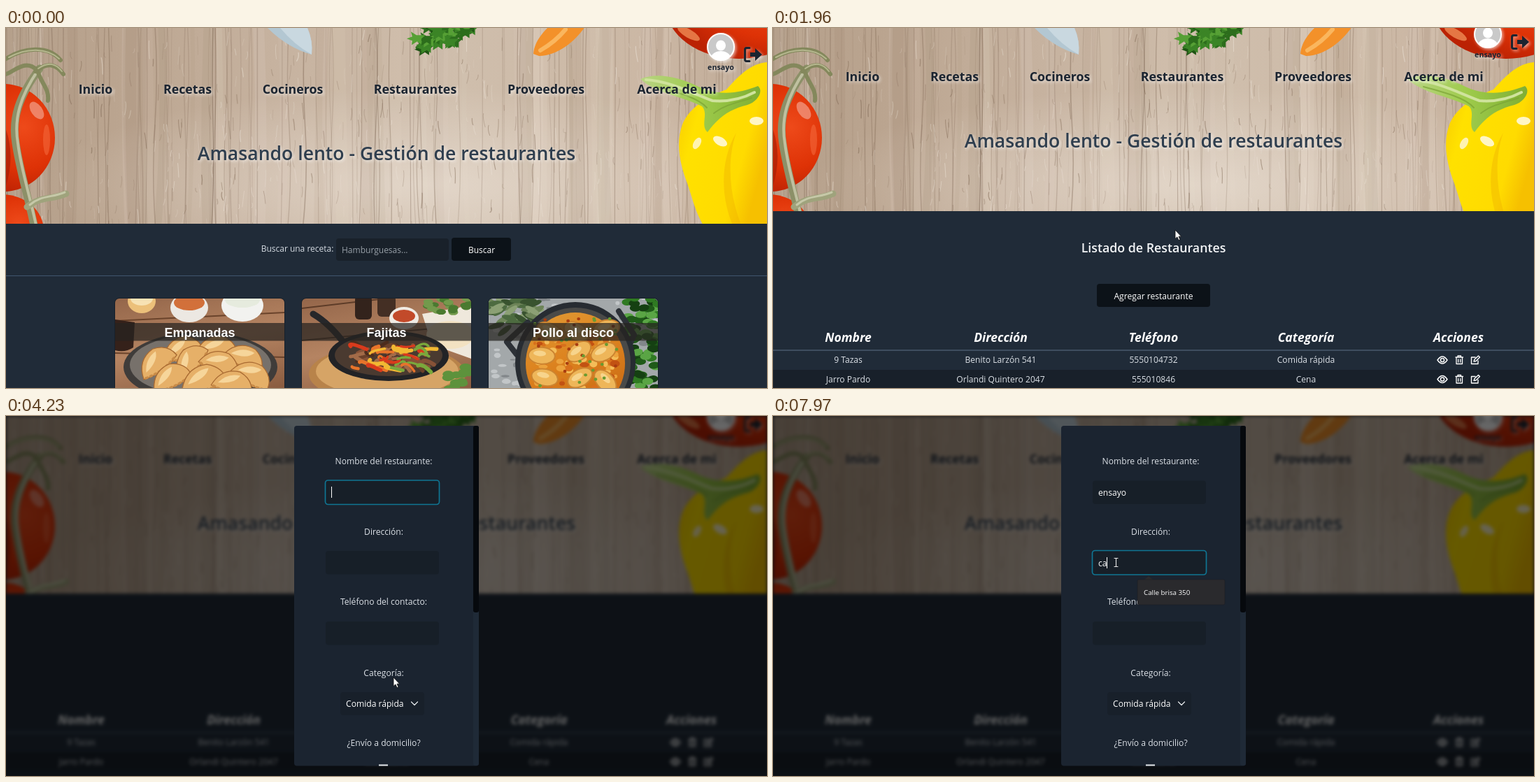
An HTML page for the animation above (8 s loop, 1088 by 515 pixels).

```html
<!DOCTYPE html>
<html lang="es">
<head>
<meta charset="utf-8">
<title>Gestión de restaurantes</title>
<style>
html, body { margin: 0; width: 100%; height: 100%; overflow: hidden; background: #202b38; }
svg { display: block; width: 100vw; height: 100vh; font-family: "Open Sans", "Noto Sans", sans-serif; }
text { white-space: pre; }
.glow { filter: drop-shadow(2px 2px 2px rgba(255,255,255,.6)); }
.arial { font-family: "Liberation Sans", Arial, sans-serif; }
</style>
</head>
<body>
<svg id="stage" viewBox="0 0 1088 515" xmlns="http://www.w3.org/2000/svg"></svg>
<script>
const LOOP = 8000;
let seed = 11;
const rnd = (a = 0, b = 1) => {
  seed = (seed * 16807) % 2147483647;
  return +(a + (b - a) * seed / 2147483647).toFixed(2);
};
const many = (n, f) => Array.from({ length: n }, (_, i) => f(i)).join('');

// Drawing helpers; text is placed by its visual middle.
const rect = (x, y, w, h, fill, more = '') =>
  `<rect x="${x}" y="${y}" width="${w}" height="${h}" fill="${fill}" ${more}/>`;
const oval = (x, y, rx, ry, fill, more = '') =>
  `<ellipse cx="${x}" cy="${y}" rx="${rx}" ry="${ry}" fill="${fill}" ${more}/>`;
const path = (d, fill, more = '') => `<path d="${d}" fill="${fill}" ${more}/>`;
const line = (d, color, width, more = '') =>
  path(d, 'none', `stroke="${color}" stroke-width="${width}" stroke-linecap="round" stroke-linejoin="round" ${more}`);
const text = (x, y, str, size, fill, more = 'text-anchor="middle"') =>
  `<text x="${x}" y="${(y + size * .36).toFixed(1)}" font-size="${size}" fill="${fill}" ${more}>${str}</text>`;
const left = 'text-anchor="start"';
const bold = 'text-anchor="middle" font-weight="700"';
const semi = 'text-anchor="middle" font-weight="600"';
const turned = (deg, x, y) => `transform="rotate(${deg} ${x} ${y})"`;

const stops = list => list.map(([o, c]) => `<stop offset="${o}" stop-color="${c}"/>`).join('');
const defs = `<defs>
<linearGradient id="wood">${stops([[0, '#b5a08b'], [.14, '#baa48f'], [.35, '#c6b29f'], [.6, '#cfbeac'], [.85, '#cbb7a4'], [1, '#bea995']])}</linearGradient>
<radialGradient id="shine" cx=".55" cy=".8" r=".5">${stops([[0, '#efe6dc'], [1, '#efe6dc00']])}</radialGradient>
<radialGradient id="tomato" cx=".7" cy=".4" r=".65">${stops([[0, '#ee4a1a'], [.6, '#de3206'], [1, '#bb2204']])}</radialGradient>
<linearGradient id="pepper" x2="1" y2=".5">${stops([[0, '#f5c400'], [.3, '#ffe100'], [.8, '#ffdb00'], [1, '#f6c000']])}</linearGradient>
<linearGradient id="stem">${stops([[0, '#b9d484'], [.5, '#9ecb4b'], [1, '#7fae33']])}</linearGradient>
<linearGradient id="plank" y2="1" x2=".3">${stops([[0, '#94664a'], [.5, '#b58462'], [1, '#8a5c40']])}</linearGradient>
<linearGradient id="stew" y2="1" x2=".4">${stops([[0, '#e09a35'], [.5, '#dd8420'], [1, '#cc6c14']])}</linearGradient>
<clipPath id="head"><rect id="headClip" width="1088" height="280"/></clipPath>
<clipPath id="card"><rect width="242" height="160" rx="6"/></clipPath>
<clipPath id="disc"><circle cx="1022" cy="27" r="19"/></clipPath>
</defs>`;

function scene() {
  const bands = many(46, () => line(`M${rnd(0, 1088)},-10 q${rnd(-8, 8)},150 ${rnd(-6, 6)},300`,
    rnd() > .45 ? '#e8ddd0' : '#8d745e', rnd(4, 22), `opacity="${rnd(.05, .16)}"`));
  const grain = many(120, () => {
    const x = rnd(0, 1088), d = rnd(-5, 5);
    return line(`M${x},-5 q${d},70 0,145 t${rnd(-4, 4)},150`, '#6b5340', rnd(.5, 1.6), `opacity="${rnd(.08, .34)}"`);
  });
  const flecks = many(520, () => {
    const light = rnd() > .45;
    return line(`M${rnd(0, 1088)},${rnd(0, 280)} q${rnd(-2, 2)},6 ${rnd(-3, 3)},${rnd(5, 26)}`,
      light ? '#efe6db' : '#7c6450', rnd(.5, 1.4), `opacity="${rnd(.15, .5)}"`);
  });
  const parsley = many(34, () => {
    const x = rnd(584, 668), y = rnd(-8, 34 - (x - 584) * .32);
    return path(`M${x},${y} l-8,-5 2,7 -8,3 8,3 -1,6 8,-5 6,4 0,-8 6,-5z`, ['#2c6d1c', '#3b8426', '#56a035', '#1f5414'][rnd(0, 3.99) | 0]);
  });
  return rect(0, 0, 1088, 280, 'url(#wood)') + rect(0, 0, 1088, 280, 'url(#shine)', 'opacity=".6"') + bands + grain + flecks +
    // vine tomatoes
    oval(-4, 157, 74, 77, 'url(#tomato)') + oval(-6, 290, 60, 52, 'url(#tomato)') +
    path('M-2,140 Q14,180 0,226 Z', '#a01c06', 'opacity=".6"') +
    oval(44, 118, 8, 14, '#f3a08a', `opacity=".7" ${turned(-35, 44, 118)}`) + oval(58, 160, 5, 22, '#f4683a', 'opacity=".6"') +
    line('M48,58 C18,98 8,130 14,165 C20,205 30,235 40,282', '#8c9068', 11) +
    line('M46,60 C20,98 11,130 17,165 C22,205 33,235 43,282', '#bfc0a0', 4) +
    line('M30,256 C50,240 65,246 86,237', '#9fa37c', 9) + line('M34,253 C50,239 65,243 84,235', '#c6c8a8', 3) +
    line('M0,44 C25,28 60,24 78,46 M42,62 C60,48 72,52 82,66 M44,60 C28,44 12,62 0,66 M44,58 C50,80 62,86 60,104', '#84885c', 6) +
    line('M4,42 C30,28 58,28 76,44 M46,58 C62,47 72,52 80,62', '#b5b78e', 2) +
    // blade, herbs, carrot
    path('M374,0 Q402,28 437,38 Q439,18 431,0Z', '#b3c7d2') + path('M392,0 Q412,24 437,38 Q439,18 431,0Z', '#c9d8e0') +
    line('M588,28 Q625,12 640,0 M618,14 Q640,12 664,6', '#2f6d1f', 5) + parsley +
    path('M754,37 C755,20 768,6 776,-2 L828,-2 C816,16 790,40 762,40Z', '#f3912a') +
    line('M764,32 Q785,20 800,2', '#fdc06c', 6, 'opacity=".8"') +
    // right tomato and pepper
    oval(1048, -32, 105, 76, 'url(#tomato)') + oval(976, 8, 18, 6, '#f79a60', `opacity=".7" ${turned(30, 976, 8)}`) +
    path('M1090,49 C1066,50 1050,66 1030,88 C1004,98 978,112 967,138 C957,166 964,196 974,222 C984,252 986,264 998,284 L1090,284Z', 'url(#pepper)') +
    path('M1044,150 C1030,190 1034,240 1052,284 L1040,284 C1022,245 1020,190 1044,150Z', '#eeb000', 'opacity=".4"') +
    path('M907,73 C930,63 962,70 990,84 C1020,98 1050,93 1075,83 C1084,90 1074,106 1060,110 C1036,116 1020,126 1003,149 C992,140 1005,122 995,112 C968,98 930,94 907,73Z', 'url(#stem)') +
    line('M915,74 C950,76 985,95 1010,104 C1035,106 1055,100 1070,92', '#cfe39c', 4) +
    line('M930,84 C960,92 990,100 1002,114 M1012,122 C1030,108 1050,106 1066,100', '#7ba336', 2, 'opacity=".7"') +
    oval(1021, 162, 11, 6, '#fff6c4', turned(30, 1021, 162)) + oval(988, 165, 5, 9, '#fff3b0', turned(30, 988, 165)) +
    oval(1073, 133, 10, 6, '#fff6c4');
}

const empanada = (x, y, turn, size = .85) => `<g transform="translate(${x} ${y}) rotate(${turn}) scale(${size})">` +
  path('M-34,13 Q-24,-20 8,-20 Q34,-12 35,12 Q0,24 -34,13Z', '#e6b068', 'stroke="#a86a32" stroke-width="1.5"') +
  path('M-24,6 Q-12,-14 10,-14 Q4,2 -24,6Z', '#f6d59a') + line('M-30,13 Q0,22 32,12', '#c98c48', 4, 'stroke-dasharray="3 5"') + '</g>';

const food = [
  () => rect(0, 0, 242, 160, 'url(#plank)') + line('M0,32 L242,20 M0,78 L242,84', '#6a432b', 2) +
    oval(38, 4, 20, 17, '#ecc07a') + oval(38, 0, 16, 10, '#f7e2b4') +
    oval(106, 13, 27, 21, '#ece8e2') + oval(106, 6, 22, 11, '#d2703a') +
    oval(182, 10, 30, 23, '#f2f2ef') + oval(182, 2, 25, 11, '#e6ebde') +
    path('M0,30 L28,34 L26,70 Q14,78 0,74Z', '#35211a') +
    oval(122, 98, 110, 50, '#3f3c3a') + oval(122, 95, 101, 44, '#77716b') +
    empanada(95, 72, -14) + empanada(146, 70, 8) + empanada(186, 84, 30) + empanada(58, 90, -36) + empanada(106, 90, -50) +
    empanada(150, 92, 24) + empanada(196, 108, 30) + empanada(78, 112, -24) + empanada(126, 114, -8, .95) + empanada(168, 120, 14),
  () => {
    const strip = c => line(`M${rnd(68, 172)},${rnd(66, 100)} q${rnd(-6, 12)},${rnd(-9, 6)} ${rnd(8, 24)},${rnd(-8, 10)}`, c, rnd(3, 6));
    return rect(0, 0, 242, 160, 'url(#plank)') + line('M0,60 L242,38 M0,14 L120,0', '#5d3c28', 2) +
      rect(76, -4, 24, 34, '#33231c', 'rx="6"') + rect(108, -4, 26, 30, '#442f24', 'rx="6"') +
      path('M172,22 L242,10 L242,86 L186,66Z', '#efe8dc') + oval(212, 52, 34, 20, '#f3e2c2') +
      many(20, i => oval(rnd(180, 242), rnd(0, 24), 7, 4, i % 2 ? '#739a4c' : '#4a7a30')) +
      oval(146, 28, 21, 16, '#f0ebe4') + oval(146, 25, 16, 9, '#c24a2a') +
      oval(122, 108, 112, 42, '#b8834a') + oval(122, 104, 102, 36, '#d6a466') +
      line('M16,22 Q40,36 62,66', '#26272a', 9) + oval(124, 82, 86, 36, '#222326') + oval(124, 81, 77, 30, '#4a3a30') +
      many(46, i => strip(['#6b4029', '#875237', '#4d2c1c', '#a36b48'][i % 4])) +
      many(34, i => strip(['#d93a1c', '#f2b832', '#7aa83c', '#e8742a'][i % 4])) +
      many(14, () => oval(rnd(200, 242), rnd(92, 130), 8, 5, '#5d923c'));
  },
  () => rect(0, 0, 242, 160, '#a3a8aa') + many(110, () => oval(rnd(0, 242), rnd(0, 130), rnd(2, 7), rnd(1, 4), rnd() > .5 ? '#c2c6c8' : '#82878a')) +
    many(40, i => oval(rnd(0, 72), rnd(0, 38), 12, 4, ['#6d8458', '#4d6b40', '#8ba074', '#39532f'][i % 4], turned(rnd(-40, 40), 30, 20))) +
    many(80, i => oval(rnd(200, 242), rnd(0, 130), 8, 5, ['#2f7a22', '#5aa545', '#1f5a18', '#154012'][i % 4], turned(rnd(-9, 9), 220, 60))) +
    line('M56,34 L26,62 L40,80 M186,18 L208,52 L200,70', '#2c3137', 8) +
    oval(124, 92, 86, 87, '#272c32') + oval(124, 92, 79, 79, '#4a4a48') + oval(124, 93, 71, 73, 'url(#stew)') +
    many(90, i => oval(rnd(66, 182), rnd(44, 128), rnd(2, 7), rnd(2, 5), ['#eca23c', '#c25212', '#f4bc58', '#d8701c'][i % 4])) +
    many(9, i => {
      const x = 82 + i % 3 * 42 + rnd(-7, 7), y = 46 + (i / 3 | 0) * 34 + rnd(-6, 6), tilt = turned(rnd(-50, 50), x, y);
      return oval(x, y, 19, 12, '#eeb659', `stroke="#cc8430" stroke-width="2" ${tilt}`) + oval(x - 3, y - 3, 9, 4, '#f7d48c', tilt);
    }) +
    many(40, i => oval(rnd(66, 184), rnd(26, 128), 2.4, 2.2, i % 3 ? '#6a9a30' : '#a83c10'))
];

const card = (x, name, draw) => `<g transform="translate(${x} 387)">` +
  rect(-1, -1, 244, 160, '#18212b', 'rx="7"') +
  `<g clip-path="url(#card)">${draw()}${rect(0, 35, 242, 25.5, '#262320', 'opacity=".72"')}</g>` +
  text(121, 48, name, 18, '#fff', bold + ' class="arial"') + '</g>';

const home = () =>
  text(416.5, 316, 'Buscar una receta:', 12, '#d5dbe2') +
  rect(472, 301, 161, 32, '#19212a', 'rx="4"') + text(480, 317.5, 'Hamburguesas...', 12, '#98a0a8', left) +
  rect(637, 300, 85, 33, '#0c1218', 'rx="4"') + text(680, 317.5, 'Buscar', 12, '#fff') +
  rect(0, 354, 1088, 1, '#41566e') +
  ['Empanadas', 'Fajitas', 'Pollo al disco'].map((n, i) => card(156 + i * 267, n, food[i])).join('');

const icons = y =>
  line(`M950,${y} Q957,${y - 10} 964,${y} Q957,${y + 10} 950,${y}Z`, '#fff', 1.5) +
  oval(957, y, 2.6, 2.6, 'none', 'stroke="#fff" stroke-width="1.5"') +
  line(`M976,${y - 4} H986.5 M979,${y - 4} V${y - 6} H983.5 V${y - 4} M977,${y - 4} V${y + 5.5} H985.5 V${y - 4} M979.7,${y - 1} V${y + 3} M982.8,${y - 1} V${y + 3}`, '#fff', 1.3) +
  line(`M1004,${y - 4} H998.5 V${y + 5.5} H1008 V${y + 1} M1002,${y + 2} L1003,${y - 1} L1008.5,${y - 6} L1010.5,${y - 4} L1005,${y + 1.5}Z`, '#fff', 1.4);

const cols = [107.5, 325.5, 544, 762, 980];
const rows = [
  ['9 Tazas', 'Benito Larzón 541', '5550104732', 'Comida rápida'],
  ['Jarro Pardo', 'Orlandi Quintero 2047', '555010846', 'Cena']
];
const list = () =>
  text(544, 333, 'Listado de Restaurantes', 17.8, '#f2f4f6', semi) +
  `<g id="add">${rect(463, 384, 162, 33, '#0c1218', 'id="addBox" rx="4"')}${text(544, 401.5, 'Agregar restaurante', 12.15, '#fff')}</g>` +
  ['Nombre', 'Dirección', 'Teléfono', 'Categoría', 'Acciones'].map((h, i) =>
    text(cols[i], 460.5, h, 17.5, '#fff', bold + ' font-style="italic"')).join('') +
  rect(0, 478.5, 1088, 1, '#5d7086') + rect(0, 507, 1088, 27, '#18202a') + rect(0, 534, 1088, 1, '#2b3947') +
  rows.map((r, j) => r.map((c, i) => text(cols[i], 493 + j * 27.5, c, 12.1, '#dbe0e6')).join('') + icons(493 + j * 27.5)).join('');

const nav = () => [['Inicio', 128], ['Recetas', 259.5], ['Cocineros', 410], ['Restaurantes', 585], ['Proveedores', 772], ['Acerca de mi', 959]]
  .map(([n, x]) => text(x, 88, n, 17.8, '#1b2430', bold)).join('') +
  rect(527, 96, 117, 1.7, '#1b2430', 'id="under"') +
  text(544, 179.5, 'Amasando lento - Gestión de restaurantes', 26.6, '#2f3e4e', semi) +
  '<circle cx="1022" cy="27" r="19" fill="#c9c9c9" stroke="#fff" stroke-width="2"/>' +
  `<g clip-path="url(#disc)">${oval(1022, 25, 7, 7.5, '#fff')}${oval(1022, 43, 14, 10, '#fff')}</g>` +
  text(1022, 56.5, 'ensayo', 10.7, '#1b2430', bold) +
  line('M1063,28.5 H1059 Q1056.5,28.5 1056.5,31 V45 Q1056.5,47.5 1059,47.5 H1063', '#1b2430', 3) +
  path('M1064,35 H1071 V29 L1081,38 L1071,47 V41 H1064Z', '#1b2430');

const field = (id, y) => rect(457, y, 162, 33.5, '#171f28', `id="${id}" rx="4"`);
const menu = (id, top, items) => `<g id="${id}">` +
  path(`M531,${top} l6,-5 6,5z`, '#2a2a2d') +
  rect(521, top, 125, 7 + 29 * items.length, '#2a2a2d', 'rx="2" stroke="#1b1e23" stroke-width=".6"') +
  items.map((s, i) => text(530, top + 18 + i * 29, s, 9.75, '#fff', left)).join('') + '</g>';

const modal = () => rect(0, 0, 1088, 515, '#000', 'opacity=".6"') +
  rect(412, 14, 264, 486.5, '#1b2430', 'rx="4"') +
  rect(668, 14, 8, 486, '#1f2a37', 'rx="3"') + rect(668, 14, 8, 267, '#06090d', 'rx="3"') +
  [['Nombre del restaurante:', 65], ['Dirección:', 165.5], ['Teléfono del contacto:', 266], ['Categoría:', 367.5], ['¿Envío a domicilio?', 468]]
    .map(([s, y]) => text(540, y, s, 12.1, '#dbe0e6')).join('') +
  field('f1', 92.5) + field('f2', 193) + field('f3', 294) +
  text(465, 110, '', 12.1, '#fff', left + ' id="name"') + text(465, 210.5, '', 12.1, '#fff', left + ' id="addr"') +
  rect(0, 0, 1, 16, '#fff', 'id="caret"') +
  rect(478, 395, 120, 33, '#18202a', 'rx="4"') + text(486, 412, 'Comida rápida', 12.1, '#fff', left) +
  line('M579.5,409 L584,413.5 L588.5,409', '#e8ebee', 1.2) +
  rect(533, 498.5, 13, 2, '#e6e9ec') +
  menu('menu1', 133, ['fajitas', 'Panadería Nube', 'lomito', 'Pollo al disco', 'empanadas', 'papa']) +
  menu('menu2', 234, ['Calle brisa 350', 'Pasaje Nublado Sur 12', 'Bosque lila 48']) +
  menu('menu3', 234, ['Calle brisa 350']);

document.getElementById('stage').innerHTML = defs +
  `<g id="page">${rect(-10, -10, 1108, 535, '#202b38')}<g id="home">${home()}</g><g id="list">${list()}</g>` +
  `<g clip-path="url(#head)">${scene()}</g><g id="nav" class="glow">${nav()}</g></g>` +
  `<g id="status">${rect(0, 499, 128, 16, '#1e2124')}${text(2.5, 507.5, '127.0.0.1:8000/restaurantes/', 9.05, '#f0f1f2', left)}</g>` +
  `<g id="modal">${modal()}</g>` +
  `<g id="arrow">${path('M0,0 V12.5 L2.9,9.9 L5,14.6 L7,13.7 L5,9.2 H8.6Z', '#fff', 'stroke="#111" stroke-width=".8"')}</g>` +
  `<g id="beam">${line('M-2.5,-6 H2.5 M0,-6 V6 M-2.5,6 H2.5', '#e8e8e8', 1.1)}</g>`;

const el = {};
document.querySelectorAll('#stage [id]').forEach(e => el[e.id] = e);

// Tables: [time, value, ...]
const mouse = [
  [70, 1052, 500], [300, 860, 370], [500, 680, 210], [690, 568, 90], [780, 568, 90], [840, 571, 80], [910, 572, 85], [990, 573, 89],
  [1300, 573, 89], [1500, 575, 160], [1740, 575, 289], [2110, 575, 289], [2180, 565, 284], [2400, 420, 380], [2620, 240, 448],
  [2720, 229, 456], [2790, 300, 482], [2930, 600, 488], [3120, 800, 498], [3360, 1005, 490], [3540, 900, 440],
  [3740, 602, 384], [3950, 554, 374], [4430, 554, 374], [4560, 574, 330], [4750, 550, 200], [4900, 535, 118],
  [6950, 535, 118], [7080, 520, 150], [7230, 490, 209]
];
const scroll = [[1750, 0], [1820, 2], [1890, 9], [1960, 18], [2030, 24], [2100, 26]];
const status = [[800, 0], [840, .4], [910, .75], [990, 1], [1680, 1], [1820, .4], [1960, 0]];
const fade = [[4159, 0], [4160, .55], [4230, 1]];
const typedName = [[0, ''], [5820, 'e'], [5890, 'en'], [6090, 'ens'], [6150, 'ensa'], [6350, 'ensay'], [6480, 'ensayo']];
const typedAddr = [[0, ''], [7770, 'c'], [7970, 'ca']];
const blink = [[0, 0], [4230, 1], [4760, 0], [5100, 1], [5690, 0], [5820, 1], [7010, 0], [7280, 1]];

function ease(keys, t, k = 1) {
  if (t <= keys[0][0]) return keys[0][k];
  const i = keys.findIndex(p => p[0] > t);
  if (i < 0) return keys[keys.length - 1][k];
  const a = keys[i - 1], b = keys[i];
  return a[k] + (b[k] - a[k]) * (t - a[0]) / (b[0] - a[0]);
}
const step = (keys, t) => keys.reduce((v, p) => p[0] <= t ? p[1] : v, keys[0][1]);
const show = (e, on) => e.setAttribute('visibility', on ? 'visible' : 'hidden');
const move = (e, x, y) => e.setAttribute('transform', `translate(${x} ${y})`);
const set = (e, attrs) => { for (const k in attrs) e.setAttribute(k, attrs[k]); };

function focus(e, y, on) {
  set(e, on
    ? { x: 456.5, y: y - .5, width: 163, height: 34.5, stroke: '#0f7593', 'stroke-width': 1.7 }
    : { x: 457, y, width: 162, height: 33.5, stroke: 'none' });
}

function draw(t) {
  const top = Math.round(ease(scroll, t));
  el.home.style.display = t < 1140 ? '' : 'none';
  el.list.style.display = t < 1140 ? 'none' : '';
  move(el.list, 0, -top);
  move(el.nav, 0, -top);
  el.headClip.setAttribute('height', 280 - top);
  show(el.under, t >= 620 && t < 1330);
  el.status.setAttribute('opacity', ease(status, t));

  const hover = t >= 3900;
  move(el.add, 0, hover ? 1 : 0);
  set(el.addBox, { fill: hover ? '#03060a' : '#0c1218', stroke: hover ? '#12394a' : 'none' });

  const open = t >= 4160;
  el.modal.style.display = open ? '' : 'none';
  el.modal.setAttribute('opacity', ease(fade, t));
  el.page.style.filter = open ? 'blur(2.4px)' : 'none';

  const second = t >= 7280;
  focus(el.f1, 92.5, !second);
  focus(el.f2, 193, second);
  el.name.textContent = step(typedName, t);
  el.addr.textContent = step(typedAddr, t);
  const box = second ? el.addr : el.name;
  const end = box.textContent ? box.getComputedTextLength() : 0;
  set(el.caret, { x: Math.round(465 + end), y: second ? 202 : 101 });
  el.caret.setAttribute('opacity', step(blink, t));

  el.menu1.style.display = t >= 5100 && t < 5820 ? '' : 'none';
  el.menu1.setAttribute('opacity', t < 5160 ? .6 : 1);
  el.menu2.style.display = t >= 7350 && t < 7770 ? '' : 'none';
  el.menu3.style.display = t >= 7770 ? '' : 'none';

  const x = Math.round(ease(mouse, t, 1)), y = Math.round(ease(mouse, t, 2));
  const seen = t >= 70 && !(t >= 5820 && t < 7010);
  const inField = open && ((y > 91 && y < 127) || (y > 192 && y < 228 && t > 7000));
  show(el.arrow, seen && !inField);
  show(el.beam, seen && inField);
  move(el.arrow, x, y);
  move(el.beam, x + .5, y + .5);
}

const start = performance.now();
function tick() {
  draw((performance.now() - start) % LOOP);
  requestAnimationFrame(tick);
}
draw(0);
requestAnimationFrame(tick);
</script>
</body>
</html>
```
